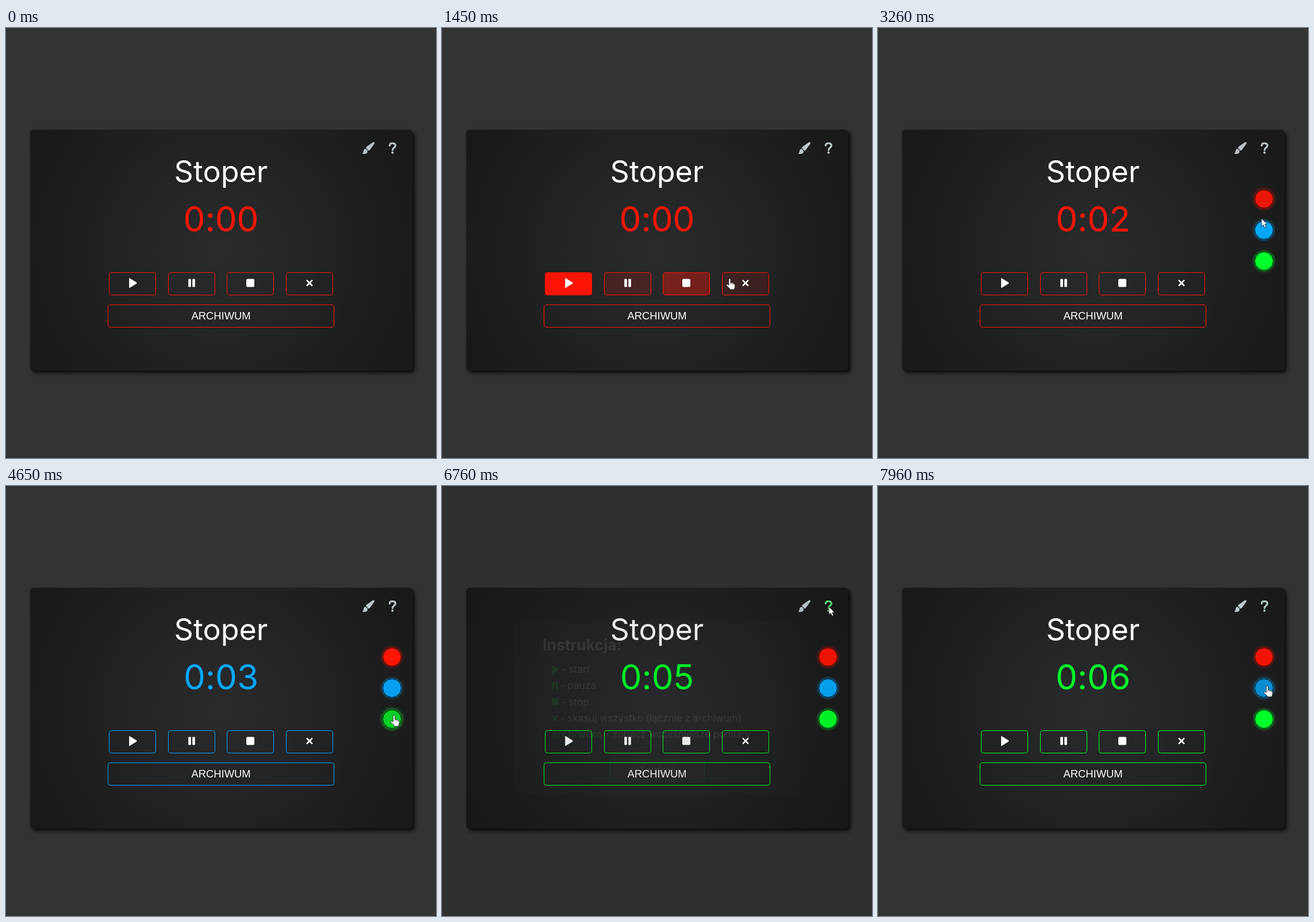
Write an HTML page that moves like this. It is 748 px wide and 748 px high and loops after 7.99 s.

```html
<!DOCTYPE html>
<html lang="pl">
<head>
<meta charset="utf-8">
<title>Stoper</title>
<style>
  html, body { margin: 0; width: 100%; height: 100%; overflow: hidden; background: #333; }
  svg { display: block; width: 100vw; height: 100vh; --accent: #fd1506; }
  text { font-family: Inter, sans-serif; fill: #fff; white-space: pre; }
  .panel { fill: url(#shade); filter: drop-shadow(4px 4px 3px rgba(0, 0, 0, .8)); }
  .title { font-size: 52px; text-anchor: middle; }
  .timer { font-size: 60px; font-feature-settings: "calt" 0; text-anchor: middle; fill: var(--accent); }
  .label { font: 18.4px "Liberation Sans", Arial, sans-serif; text-anchor: middle; }
  .box { fill: none; stroke: var(--accent); }
  .icon { fill: #fff; }
  .help text { font-size: 17px; }
  .help .head { font-size: 26.5px; font-weight: 700; }
  .help .key { font-size: 18px; font-weight: 700; fill: var(--accent); }
  .help .label { font-size: 18.4px; }
  .help .icon { fill: var(--accent); }
  .pointer path { fill: #fff; stroke: #111; stroke-width: .8; stroke-linejoin: round; }

  .target { --hover: 0; }
  .fill { fill: var(--accent); opacity: var(--hover); }
  .tool { color: color-mix(in srgb, var(--accent) calc(var(--hover) * 100%), #bcc8cc); fill: currentColor; }
  .swatch { filter: drop-shadow(0 0 calc(2.5px + var(--hover) * 2px) var(--color)); }
  .disc { fill: var(--color); stroke: #0b0b0b; }
  .dim { fill: #24221f; opacity: calc(var(--hover) * .38); }
</style>
</head>
<body>
<svg viewBox="0 0 748 748" xmlns="http://www.w3.org/2000/svg">
  <defs>
    <radialGradient id="shade" gradientUnits="userSpaceOnUse" cx="374" cy="387" r="370">
      <stop stop-color="#292b2d"/><stop offset="1" stop-color="#191919"/>
    </radialGradient>
    <clipPath id="inside"><rect x="42" y="177" width="665" height="419" rx="6"/></clipPath>
    <path id="play" d="M-5.8-7.6Q-5.8-9-4.4-8.2L7-1.2Q8.2 0 7 1.2L-4.4 8.2Q-5.8 9-5.8 7.6z"/>
    <path id="pause" d="M-4.8-7h2.6q1 0 1 1V6q0 1-1 1h-2.6q-1 0-1-1V-6q0-1 1-1zM2.2-7h2.6q1 0 1 1V6q0 1-1 1H2.2q-1 0-1-1V-6q0-1 1-1z"/>
    <rect id="stop" x="-7" y="-7" width="14" height="14" rx="2"/>
    <path id="cross" d="M-5.8-4L-4-5.8 0-1.8 4-5.8 5.8-4 1.8 0 5.8 4 4 5.8 0 1.8-4 5.8-5.8 4-1.8 0z"/>
  </defs>

  <rect width="748" height="748" fill="#333"/>
  <rect class="panel" x="42" y="177" width="665" height="419" rx="6"/>
  <text class="title" x="374" y="268">Stoper</text>
  <text class="timer" id="timer" x="374" y="354">0:00</text>
  <g id="buttons"></g>
  <text class="label" x="374" y="507">ARCHIWUM</text>

  <g class="tool target">
    <path d="M638.6 198.4c2.4-.2 3 1.6 1.8 3.4L633 212q-1.5 1.6-3.4 1.3-.7-3.2-3.6-4.2 0-1.5 1.3-2.7z"/>
    <path d="M625.2 210.3c2.5.6 3.7 2.3 3.7 4.4 0 3-2.4 4.3-5 4.3h-3.4q-1.4-.7.4-2c1-1 .8-2 1.2-3.6q.8-3 3.1-3.1z"/>
  </g>
  <g class="tool target">
    <path d="M667.4 204.4q.2-3.9 4.7-3.9 5.3 0 5.3 4.2c0 3.2-5 3.6-5 7.6" fill="none" stroke="currentColor" stroke-width="3.2" stroke-linecap="round"/>
    <circle cx="672.3" cy="216.7" r="2"/>
  </g>
  <g clip-path="url(#inside)"><g id="swatches"></g></g>

  <g class="help" id="help">
    <rect width="748" height="748" opacity=".67"/>
    <rect x="125" y="237" width="498" height="299" rx="11" fill="#202121"/>
    <text class="head" x="175" y="286">Instrukcja:</text>
    <use class="icon" href="#play" transform="translate(196.5 319) scale(.9)"/>
    <text x="208" y="325">- start</text>
    <use class="icon" href="#pause" transform="translate(196.5 347.5) scale(.95)"/>
    <text x="206" y="353">- pauza</text>
    <use class="icon" href="#stop" transform="translate(197 375.5) scale(.9)"/>
    <text x="208" y="382">- stop</text>
    <use class="icon" href="#cross" transform="translate(196.5 404) scale(.95)"/>
    <text x="206" y="410">- skasuj wszystko (łącznie z archiwum)</text>
    <text class="key" x="191" y="438">archiwum</text>
    <text x="284" y="438">- zobacz wcześniejsze pomiary</text>
    <rect class="box" x="291.5" y="475.5" width="165" height="39" rx="3" style="fill:#333"/>
    <text class="label" x="374" y="501">Zamknij</text>
  </g>

  <g class="pointer" id="pointer">
    <circle id="press" r="10" fill="#ff0" fill-opacity=".5"/>
    <path id="arrow" d="M0 0V14l3.2-3 2.3 5.2 2.6-1.1L5.8 10H10z"/>
    <g id="hand">
      <path d="M-1.6 1.2q0-1.7 1.6-1.7t1.6 1.7V7q2.7-.6 3.3.6 2-.4 2.5.8 1.8 0 1.8 2V14q0 1.8-1 3.2v1.6H.2v-1.6L-5.4 12q-1-1.6.2-2.4 1.2-.6 2.5.8l1.1 1z"/>
      <path d="M1.6 7v3M4.9 8v2.4M7.4 8.8v2" style="fill:none;stroke-width:.6"/>
    </g>
  </g>
</svg>
<script>
const LOOP = 7990;
const SECOND = 1020;
const HOVER_LAG = 80;
const colors = { red: '#fd1506', blue: '#06a7fb', green: '#00ff2b' };

// Mouse button: [down, up] in ms
const clicks = {
  start: [1020, 1100], palette: [2413, 2470], blue: [3520, 3660],
  green: [5610, 5740], help: [6620, 6720], close: [7340, 7430]
};

const $ = id => document.getElementById(id);
const clamp = v => Math.min(1, Math.max(0, v));
const ramp = (t, from, duration) => clamp((t - from) / duration);
const within = (t, [from, to]) => t >= from && t < to;
const show = (el, on) => el.setAttribute('opacity', +on);

const linear = p => p;
const smooth = p => p * p * (3 - 2 * p);
const easeOut = p => 1 - (1 - p) ** 2;

// Pointer moves: start, end, x, y, easing
const moves = [
  [130, 140, 690, 740, linear],
  [140, 920, 230, 446, smooth],
  [1270, 1450, 500, 437, linear],
  [1450, 2050, 629, 206, easeOut],
  [2900, 3370, 673, 351, smooth],
  [4360, 4700, 675, 402, smooth],
  [6080, 6560, 673, 210, smooth],
  [7710, 7960, 677, 348, smooth]
];

function pointerAt(t) {
  let x = 690, y = 760;
  for (const [from, to, nextX, nextY, ease] of moves) {
    const p = ease(ramp(t, from, to - from));
    x += (nextX - x) * p;
    y += (nextY - y) * p;
  }
  return { x, y };
}

function button(icon, x, y, width) {
  const shape = `x="${x + .5}" y="${y + .5}" width="${width - 1}" height="39" rx="4"`;
  return `<rect class="fill target" ${shape}/><rect class="box" ${shape}/>
    <use class="icon" href="#${icon}" x="${x + width / 2}" y="443.6"/>`;
}

function swatch(color, i) {
  const place = `cx="671.5" cy="${297.5 + 54 * i}"`;
  return `<g class="swatch target" style="--color:${color}">
    <circle class="disc" ${place} r="16"/><circle class="dim" ${place} r="15.5"/></g>`;
}

$('buttons').innerHTML = ['play', 'pause', 'stop', 'cross']
  .map((icon, i) => button(icon, Math.round(179 + 102.7 * i), 425, 82)).join('')
  + button('', 177, 481, 394);
$('swatches').innerHTML = Object.values(colors).map(swatch).join('');

const targets = [...document.querySelectorAll('.target')].map(el => ({ el, box: el.getBBox() }));
const play = targets[0];

function hovers({ box }, t) {
  if (within(t, [clicks.help[1], clicks.close[0] + 60])) return false;
  const { x, y } = pointerAt(t);
  return within(x, [box.x, box.x + box.width]) && within(y, [box.y, box.y + box.height]);
}

// The highlight follows the hover state with an exponential lag.
function highlight(target, t) {
  const step = 5;
  let level = 0;
  for (let s = t - HOVER_LAG * 6; s <= t; s += step) {
    const focused = target === play && within(s, [clicks.start[0], clicks.palette[0]]);
    const goal = focused || hovers(target, s) ? 1 : 0;
    level += (goal - level) * step / HOVER_LAG;
  }
  return level;
}

function render(t) {
  const accent = t < clicks.blue[1] ? colors.red : t < clicks.green[1] ? colors.blue : colors.green;
  document.querySelector('svg').style.setProperty('--accent', accent);

  const seconds = Math.max(0, Math.floor((t - clicks.start[1]) / SECOND));
  $('timer').textContent = '0:' + String(seconds).padStart(2, '0');

  for (const target of targets) {
    target.el.style.setProperty('--hover', highlight(target, t).toFixed(3));
  }
  const slide = easeOut(ramp(t, clicks.palette[1], 330));
  $('swatches').setAttribute('transform', `translate(${60 * (1 - slide)})`);
  $('help').setAttribute('opacity', ramp(t, clicks.help[1], 500) - ramp(t, clicks.close[1], 250));

  const { x, y } = pointerAt(t);
  const overTarget = targets.some(target => hovers(target, t));
  $('pointer').setAttribute('transform', `translate(${x} ${y})`);
  show($('hand'), overTarget);
  show($('arrow'), !overTarget);
  show($('press'), Object.values(clicks).some(span => within(t, span)));
}

const begin = performance.now();
function frame() {
  render((performance.now() - begin) % LOOP);
  requestAnimationFrame(frame);
}
frame();
</script>
</body>
</html>
```
